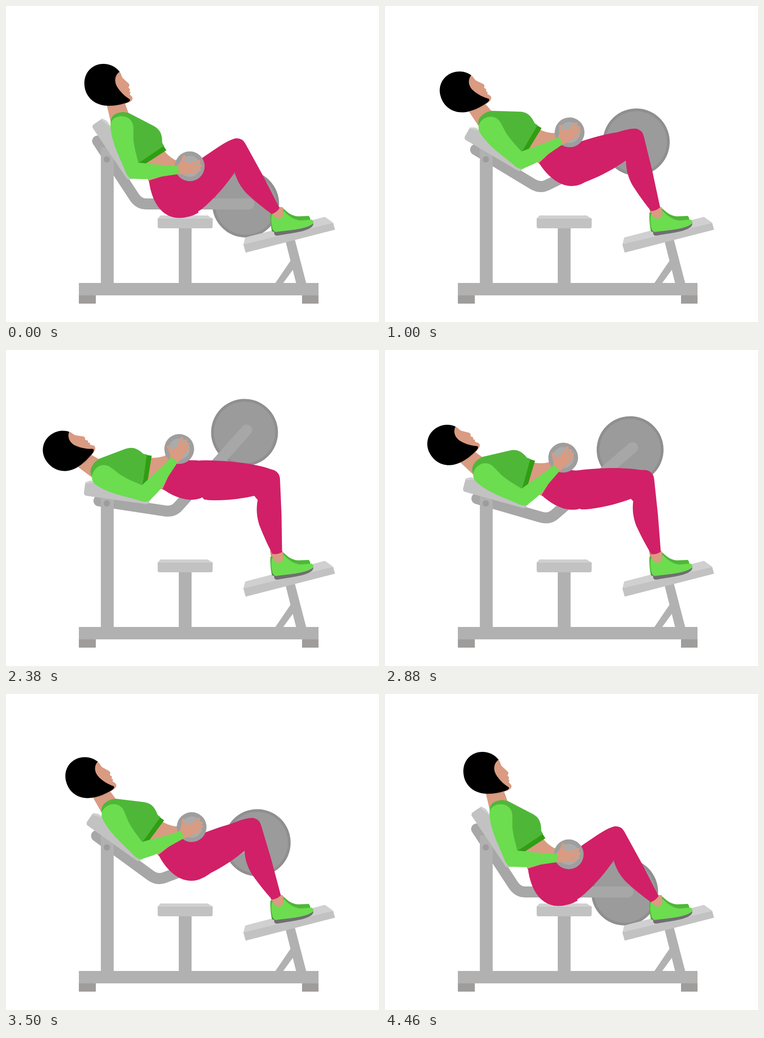
These frames come from a looping animation (814 by 688 pixels, 4.5 s). An HTML page with a canvas:

```html
<!DOCTYPE html>
<html lang="en">
<head>
<meta charset="utf-8">
<title>Hip thrust machine</title>
<style>
html, body { margin: 0; width: 100%; height: 100%; overflow: hidden; background: #fff; }
canvas { display: block; }
</style>
</head>
<body>
<canvas id="stage" width="814" height="688"></canvas>
<script>
const ctx = document.getElementById('stage').getContext('2d');
const LOOP = 4500, SWING = 48.2, MID = 0.528;
const PIVOT = [240, 308], COLLAR = [250, 228], ELBOW = [278, 358];
const HEM = [588.5, 446.5], KNEE = [548, 316];

const C = {
  frame: '#b1b1b1', feet: '#9f9d9c', pad: '#c2c2c2', padTop: '#d0d0d0',
  lever: '#a7a7a7', rim: '#8f8f8f', plate: '#9b9b9b', disc: '#9e9e9e', discIn: '#ababab',
  skin: '#d99b81', shade: '#c98a70', hair: '#000', pants: '#d12067',
  top: '#4fb738', sleeve: '#6bdd4f', band: '#2f9e13', sole: '#6f6f6f'
};

const shape = {
  backrest: 'M189 265 Q188 261 191 258 L207 247 L226 262 L286 365 L272 377 Q267 380 263 375 Z',
  backTop: 'M207 246.500 L210 245 L220 250 L300 365 L286 366 Z',
  lever: 'M200 294 L280 416 Q290 431 306 431 L530 431',
  footTop: 'M522 504 L696 459 L714 472 L518 520 Z',
  footFront: 'M518 519 L714 472 L718 487 L523 537 Z',
  strut: 'M610 512 L630 507 L655 603 L633 603 Z',
  brace: 'M622 553 L627 573 L605 603 L588 603 Z',
  seat: 'M331 462 H451 V480 Q451 484 447 484 H335 Q331 484 331 480 Z',
  seatTop: 'M337 456 H440 L451 463 H331 Z',
  ankle: 'M579 436 L604 438 L607 458 L597 466 L583 460 Z',
  ankleBack: 'M576 436 L583 440 L583 455 L579 452 Z',
  shoeBack: 'M604 440 C612 446 620 457 638 458 L660 457 Q665 460 664 468 L610 476 L580 490 Q576 470 577 450 L586 449 Z',
  shoe: 'M581 452 C584 458 588 463 597 463 C604 462 606 455 606 446 C614 454 624 465 642 467 L667 465 Q673 469 670 474 C658 483 640 486 588 492 Q582 490 581 480 Q577 465 581 452 Z',
  sole: 'M581 485 Q584 491 590 491 C635 487 655 484 671 473 Q671 478 666 482 C652 492 625 494 592 500 Q585 501 585 492 L581 491 Z',
  hair: 'M171 168 C171 143 190 126 212 126 C228 126 240 133 248 143 C237 151 236 164 242 175 C249 187 260 197 270 203 Q272 207 265 210 C250 215 235 218 219 217 C190 215 171 195 171 168 Z',
  face: 'M247 142 L251 148 Q253 156 257 159 L268 169 Q271 173 267 177 L271 182 L269 186 L272 188 L270 192 L276 199 Q277 206 270 209 Q250 218 225 218 L225 160 Z',
  torso: 'M229 262 C225 240 238 231 258 231 L268 233 L322 261 C337 269 341 280 341 298 L345 305 L288 342 L242 305 Z',
  band: 'M288 342 L344 305 L350 314 L302 345 Z',
  belly: 'M288 341 L343 312 Q352 326 370 336 L400 360 L370 378 L312 383 L300 360 Z',
  pelvis: 'M312 380 C316 416 334 461 378 461.500 Q402 461 420 450 L409 395 L396 380 Q380 363 360 365 Z',
  thigh: 'M548 316 C520 323 490 327 455 327 Q440 327 432 325 L405 290 L412 241 L430 240 C480 240 545 246 585 262 L598 280 L575 300 Z',
  shin: 'M428 331 C455 313 485 290 503 288 Q516 288 522 299 L560 368 L597 440 Q590 450 580 453 C562 440 546 427 526 409 C512 394 504 380 499 362 Z',
  upperArm: 'M228 262 C228 247 240 240 252 240 C268 240 278 251 278 266 L278 290 C280 310 285 325 289 342 L276 377 C266 374 262 365 258 354 C246 325 230 295 228 262 Z',
  forearm: 'M287 341 C315 343 345 348 375 348 Q378 358 376 366 L335 372 Q320 377 300 377 L276 376 Q267 374 264 366 L272 345 Z',
  palm: 'M373 348 L384 337 Q396 340 403 344 L405 358 Q400 366 388 367 L373 366 Z',
  fingers: 'M383 342 L389 328 M399 346 L422 338 M401 350 L424 348 M399 355 L422 356 M394 361 L413 363'
};
for (const k in shape) shape[k] = new Path2D(shape[k]);

const fill = (name, color) => { ctx.fillStyle = color; ctx.fill(shape[name]); };
const rect = (x, y, w, h, color) => { ctx.fillStyle = color; ctx.fillRect(x, y, w, h); };
const stroke = (name, width, color) => {
  ctx.lineWidth = width;
  ctx.lineCap = ctx.lineJoin = 'round';
  ctx.strokeStyle = color;
  ctx.stroke(shape[name]);
};
function circle(x, y, r, color) {
  ctx.fillStyle = color;
  ctx.beginPath();
  ctx.arc(x, y, r, 0, Math.PI * 2);
  ctx.fill();
}

// Turn around a joint, optionally moving that joint to a new place.
function turn(joint, deg, draw, to = joint) {
  ctx.save();
  ctx.translate(to[0], to[1]);
  ctx.rotate(deg * Math.PI / 180);
  ctx.translate(-joint[0], -joint[1]);
  draw();
  ctx.restore();
}

function spin(p, c, deg) {
  const a = deg * Math.PI / 180, x = p[0] - c[0], y = p[1] - c[1];
  return [c[0] + x * Math.cos(a) - y * Math.sin(a), c[1] + x * Math.sin(a) + y * Math.cos(a)];
}

// Parabola through low, middle and high poses.
function pose(u, a, b, c) {
  return a * (u - MID) * (u - 1) / MID + b * u * (u - 1) / (MID * (MID - 1)) + c * u * (u - MID) / (1 - MID);
}
const posePoint = (u, a, b, c) => [0, 1].map(i => pose(u, a[i], b[i], c[i]));

function bezier(x, x1, x2) {
  let lo = 0, hi = 1;
  for (let i = 0; i < 24; i++) {
    const s = (lo + hi) / 2, r = 1 - s;
    if (3 * r * r * s * x1 + 3 * r * s * s * x2 + s * s * s < x) lo = s; else hi = s;
  }
  return lo * lo * (3 - 2 * lo);
}

function lift(t) {
  if (t <= 170 || t >= 4480) return 0;
  if (t < 2050) return bezier((t - 170) / 1880, 0.346, 0.45);
  if (t < 2320) return 1;
  return (1 + Math.cos(Math.PI * (t - 2320) / 2160)) / 2;
}

function machine(angle) {
  turn(PIVOT, angle, () => {
    circle(523, 431, 73, C.rim);
    circle(523, 431, 67, C.plate);
    stroke('lever', 24, C.lever);
  });
  rect(207, 308, 28, 296, C.frame);
  circle(220, 334, 7, C.feet);
  turn(PIVOT, angle, () => {
    fill('backTop', C.padTop);
    fill('backrest', C.pad);
  });
  rect(377, 484, 28, 120, C.frame);
  fill('brace', C.frame);
  fill('strut', C.frame);
  rect(159, 603, 523, 27, C.frame);
  rect(159, 630, 37, 18, C.feet);
  rect(646, 630, 36, 18, C.feet);
  fill('seat', C.pad);
  fill('seatTop', C.padTop);
  fill('footTop', C.padTop);
  fill('footFront', C.pad);
}

function neck(angle, nod) {
  const body = p => spin(p, PIVOT, angle);
  const head = p => body(spin(p, COLLAR, nod));
  const pts = [head([219, 212]), head([259, 210]), body([268, 235]), body([250, 250]), body([228, 250])];
  ctx.fillStyle = C.skin;
  ctx.beginPath();
  pts.forEach(p => ctx.lineTo(p[0], p[1]));
  ctx.fill();
  const a = head([224, 218]), b = head([246, 220]), c = head([262, 212]);
  ctx.fillStyle = C.shade;
  ctx.beginPath();
  ctx.moveTo(a[0], a[1]);
  ctx.quadraticCurveTo(b[0], b[1], c[0], c[1]);
  ctx.fill();
}

function woman(u, angle) {
  const nod = pose(u, 0, 9, 14);
  fill('ankleBack', C.shade);
  fill('shoeBack', C.top);
  fill('ankle', C.skin);
  fill('sole', C.sole);
  fill('shoe', C.sleeve);

  neck(angle, nod);
  turn(PIVOT, angle, () => {
    turn(COLLAR, nod, () => {
      fill('face', C.skin);
      fill('hair', C.hair);
    });
    circle(374, 347, 12, C.lever);
    fill('belly', C.skin);
    fill('torso', C.top);
    fill('band', C.band);
    fill('pelvis', C.pants);
  });

  turn(KNEE, pose(u, -42.5, -22, 0), () => fill('thigh', C.pants),
    posePoint(u, [499, 362], [526, 336], KNEE));
  turn(HEM, pose(u, 0, 14.9, 26.4), () => fill('shin', C.pants),
    posePoint(u, HEM, [590.5, 442.5], [592, 442]));

  turn(PIVOT, angle, () => {
    circle(401, 349, 32.5, C.disc);
    circle(401, 349, 23, C.discIn);
    fill('palm', C.skin);
    stroke('fingers', 6, C.skin);
    turn(ELBOW, -4 * u, () => fill('upperArm', C.sleeve));
    fill('forearm', C.sleeve);
  });
}

function frame() {
  const u = lift(performance.now() % LOOP), angle = -SWING * u;
  rect(0, 0, 814, 688, '#fff');
  machine(angle);
  woman(u, angle);
  requestAnimationFrame(frame);
}
frame();
</script>
</body>
</html>
```
